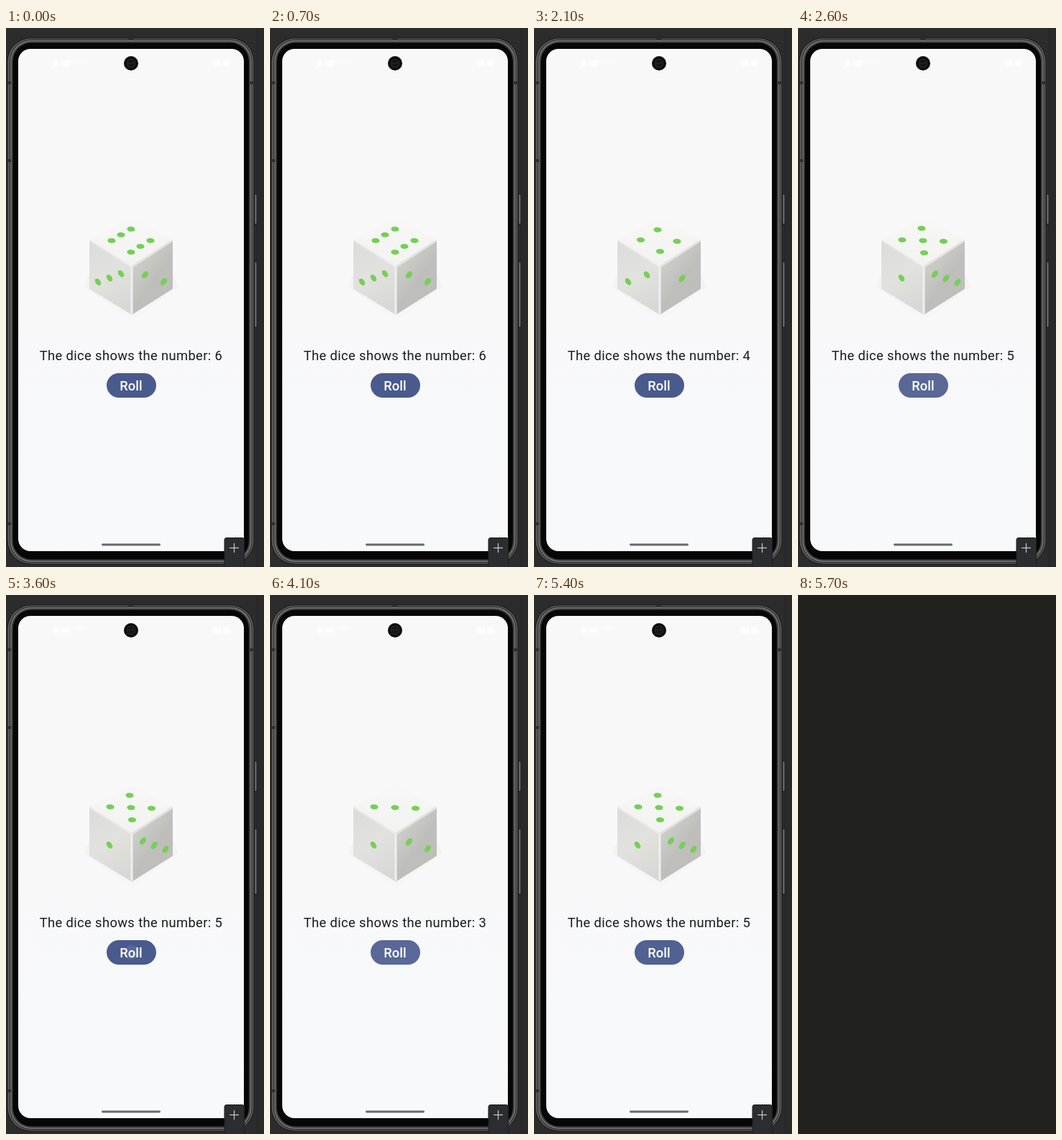
An HTML page with a canvas for the animation above (6600 ms loop, 359 px wide and 748 px high).

```html
<!DOCTYPE html>
<html lang="en">
<head>
<meta charset="utf-8">
<title>Dice roller</title>
<style>
  html, body { margin: 0; width: 100%; height: 100%; overflow: hidden; background: #2c2c2d; }
  canvas { display: block; width: 359px; height: 748px; }
</style>
</head>
<body>
<canvas id="stage"></canvas>
<script>
const W = 359, H = 748, LOOP = 6600, END = 5700, STEP = 100;
const canvas = document.getElementById('stage');
const ctx = canvas.getContext('2d');
const dpr = window.devicePixelRatio || 1;
canvas.width = W * dpr;
canvas.height = H * dpr;
ctx.scale(dpr, dpr);

// Pip centres on the three visible faces
const sides = {
  6: { top: [[174, 279], [160, 287], [147, 295], [201, 295], [187, 303], [174, 311]],
       left: [[128, 352.5], [144, 347], [160, 341]], right: [[193.5, 342.5], [219.5, 352]] },
  5: { top: [[172, 278], [145, 294], [174, 295], [202.5, 296], [175.5, 312]],
       left: [[144, 347]], right: [[190.5, 341.5], [206, 347.5], [222, 353]] },
  4: { top: [[172, 280], [148.5, 294], [199, 296], [175.5, 310]],
       left: [[131, 352], [157, 342.5]], right: [[206, 347.5]] },
  3: { top: [[145, 294], [174, 295], [202.5, 296]],
       left: [[144, 347]], right: [[193.5, 342.5], [219.5, 352]] }
};

// Press time, moment the value changes, full ripple, fade start and end
const rolls = [
  { press: 1200, at: 1300, value: 4, full: 1500, fade: 1700, end: 2100 },
  { press: 2500, at: 2600, value: 5, full: 2600, fade: 2700, end: 3100 },
  { press: 3600, at: 3700, value: 3, full: 3900, fade: 4100, end: 4500 },
  { press: 4800, at: 4900, value: 5, full: 5000, fade: 5300, end: 5500 }
];

const clamp = x => Math.max(0, Math.min(1, x));

function box(x, y, w, h, r, fill) {
  ctx.beginPath();
  ctx.roundRect(x, y, w, h, r);
  ctx.fillStyle = fill;
  ctx.fill();
}

function poly(points, fill) {
  ctx.beginPath();
  points.forEach(([x, y]) => ctx.lineTo(x, y));
  ctx.closePath();
  ctx.fillStyle = fill;
  ctx.fill();
}

function line(points, color, width) {
  ctx.beginPath();
  points.forEach(([x, y]) => ctx.lineTo(x, y));
  ctx.strokeStyle = color;
  ctx.lineWidth = width;
  ctx.stroke();
}

function disc(x, y, r, fill) {
  box(x - r, y - r, 2 * r, 2 * r, r, fill);
}

function blend(x0, y0, x1, y1, ...colors) {
  const g = ctx.createLinearGradient(x0, y0, x1, y1);
  colors.forEach((c, i) => g.addColorStop(i / (colors.length - 1), c));
  return g;
}

function label(text, x, y, weight, spacing, color) {
  ctx.font = `${weight} 18.34px Roboto, sans-serif`;
  ctx.letterSpacing = spacing + 'px';
  ctx.fillStyle = color;
  ctx.fillText(text, x, y);
}

function drawPhone() {
  box(0, 0, W, H, 0, '#2c2c2d');
  box(348, 0, 11, H, 0, '#2a2a2b');
  box(348, 0, 1, H, 0, '#242425');

  // Side keys
  for (const [y, h] of [[230, 43], [324, 92]]) {
    box(345.5, y, 4, h, 1.5, '#1b1b1b');
    box(346.5, y + 1, 2, h - 2, 1, '#777777');
  }

  // Metal rim, from the outside in
  box(1.5, 13.5, 344, 731, 33, '#161616');
  box(2.5, 14.5, 342, 729, 32, '#5c5c5c');
  box(5, 16, 337.5, 726, 30, '#242424');
  box(6, 17, 335.5, 724, 29, '#777777');
  box(7.5, 18.5, 332.5, 721, 28, '#404040');
  box(9.5, 20.5, 328.5, 717, 26, '#070707');

  // Antenna bands
  for (const y of [76, 184, 688]) box(2, y - 2, 5, 4, 0, '#303030');
  box(339, 74, 5, 4, 0, '#303030');
  box(170, 14, 7, 3, 0, '#303030');

  box(17, 29, 314, 697, 17, blend(0, 29, 0, 726, '#f8f8f8', '#f8f8f9', '#f8f9fb'));

  // Status bar, white on near white
  box(66, 45, 6, 8, 1, '#ffffff');
  box(76, 45, 14, 8, 2, '#fdfdfd');
  box(94, 45, 18, 2, 1, '#fcfcfc');
  box(288, 44, 11, 9, 3, '#fdfdfd');
  box(302, 44, 9, 9, 3, '#fdfdfd');

  disc(174, 49, 10, '#0c0c0c');
  disc(174, 49, 6.5, '#222222');
  disc(174, 49, 5, '#151515');
  disc(171.7, 48.8, 0.9, '#3c3c3c');
  disc(176.3, 48.8, 0.9, '#3c3c3c');

  box(133, 715.6, 82, 2.8, 1.4, '#69696a');
}

function drawCube() {
  poly([[108, 358], [116, 342], [232, 342], [240, 358], [175, 407]],
    blend(0, 342, 0, 407, '#f2f2f2', '#f7f7f7'));
  poly([[116, 294], [175, 331], [175, 398], [116, 362]],
    blend(116, 300, 175, 385, '#dcdcda', '#e1e1de', '#d7d7d5'));
  poly([[232, 294], [175, 331], [175, 398], [232, 362]],
    blend(178, 330, 232, 370, '#cdcdc9', '#bebfba', '#bdbeb9'));
  poly([[174, 264], [232, 294], [175, 332], [116, 294]],
    blend(0, 264, 0, 332, '#f7f7f6', '#f2f3f0'));
  line([[117, 295], [174.5, 331.5]], '#eaeae8', 2.4);
  line([[231.5, 295], [175, 331.5]], '#e3e4e0', 3);
  line([[175, 331], [175, 397]], '#efefec', 3);
}

function drawPips(centres, angle, rx, ry) {
  ctx.fillStyle = '#75cf56';
  for (const [x, y] of centres) {
    ctx.beginPath();
    ctx.ellipse(x, y, rx, ry, angle, 0, 2 * Math.PI);
    ctx.fill();
  }
}

function drawButton(t) {
  box(140, 479, 69, 34, 17, '#495a8d');
  const roll = rolls.find(r => t >= r.press && t < r.end);
  if (roll) {
    const grow = clamp((t - roll.press) / (roll.full - roll.press));
    const alpha = 1 - clamp((t - roll.fade) / (roll.end - roll.fade));
    ctx.save();
    ctx.beginPath();
    ctx.roundRect(140, 479, 69, 34, 17);
    ctx.clip();
    disc(174.5, 496, 10 + 30 * grow, `rgba(255, 255, 255, ${0.085 * alpha})`);
    ctx.restore();
  }
  label('Roll', 158.3, 502.5, 500, 0.08, '#ffffff');
}

function drawPlus() {
  box(303.5, 707, 28.5, 45, 4, '#1f2022');
  box(304.5, 708, 26.5, 44, 3, '#2c2d30');
  line([[311, 721.5], [324, 721.5]], '#c9cacd', 1.2);
  line([[317.5, 715], [317.5, 728]], '#c9cacd', 1.2);
}

function draw(time) {
  const t = Math.floor(time % LOOP / STEP) * STEP;
  if (t >= END) {
    box(0, 0, W, H, 0, '#21221d');
    return;
  }
  const value = rolls.reduce((v, r) => t >= r.at ? r.value : v, 6);
  const side = sides[value];
  drawPhone();
  drawCube();
  drawPips(side.top, 0.08, 5.6, 3.6);
  drawPips(side.left, 0.95, 5.4, 3.5);
  drawPips(side.right, -0.9, 5.7, 3.6);
  label('The dice shows the number: ' + value, 46.7, 461, 400, 0.38, '#1a1b1f');
  drawButton(t);
  drawPlus();
}

const start = performance.now();
function tick() {
  draw(performance.now() - start);
  requestAnimationFrame(tick);
}
tick();
</script>
</body>
</html>
```
